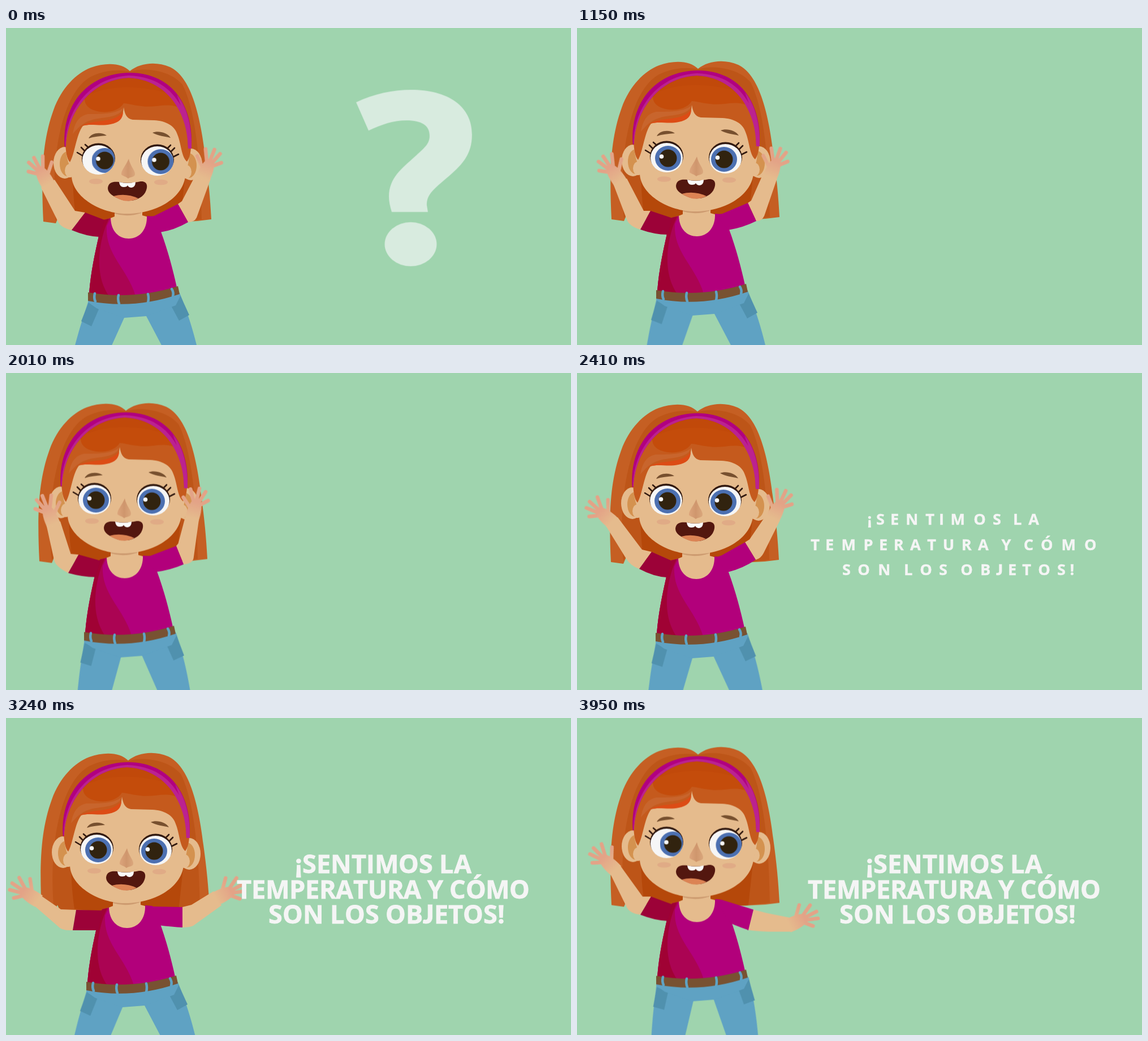
Animation, 999 px wide and 560 px high, one loop 4.03 s. Source, as an HTML page without scripts:

```html
<!DOCTYPE html>
<html lang="es">
<head>
<meta charset="utf-8">
<title>Sentimos</title>
<style>
html,body{margin:0;width:100%;height:100%;overflow:hidden;background:#9fd4ae}
svg{position:absolute;left:0;top:0;width:999px;height:560px}
.body,.leg,.iris,.ask,.arm,.sleeve,.hand,.line i{animation:4030ms linear infinite}

.body{animation-name:sway}
@keyframes sway{
  0%{transform:translate(0,0)}
  13.15%{transform:translate(-2px,0)}
  28.5%{transform:translate(-5px,-4px)}
  40.4%{transform:translate(-7px,-7.5px)}
  50%{transform:translate(-7px,-9.5px)}
  59.8%{transform:translate(-6px,-8px)}
  67%{transform:translate(-6px,-9px)}
  80.4%{transform:translate(-3px,-1px)}
  98%,100%{transform:translate(-5px,-11.5px)}
}

.leg{animation-name:legL;transform-origin:155px 485px}
.leg.r{animation-name:legR;transform-origin:300px 478px}
@keyframes legL{
  0%{transform:rotate(0)}
  13.15%{transform:rotate(-.7deg)}
  28.5%{transform:rotate(-5deg)}
  40.4%,59.8%{transform:rotate(-8deg)}
  50%,67%{transform:rotate(-9deg)}
  80.4%{transform:rotate(-1.5deg)}
  98%,100%{transform:rotate(-11deg)}
}
@keyframes legR{
  0%,13.15%,28.5%,80.4%{transform:rotate(0)}
  40.4%{transform:rotate(2.2deg)}
  50%,67%{transform:rotate(4deg)}
  59.8%{transform:rotate(3deg)}
  98%,100%{transform:rotate(8.5deg)}
}

.iris{animation-name:look}
@keyframes look{
  0%,1.7%,91%,100%{transform:translate(8.5px,0)}
  7%,86%{transform:translate(0,0)}
}

.ask{animation-name:flip;transform-origin:728px 280px}
@keyframes flip{
  0%{transform:scale(1,1);opacity:1}
  3.3%{transform:scale(.904,.846)}
  6.6%{transform:scale(.808,.607)}
  9.9%{transform:scale(.711,.335)}
  13.15%,14.8%{transform:scale(.615,.08);opacity:1}
  14.85%,100%{transform:scale(.615,0);opacity:0}
}

/* arms: outline, sleeve and hand share the same beats */
.arm.l{animation-name:armL}
@keyframes armL{
  0%{d:path("M140 326L122 323L86 268L62 282L92 342Q97 353 116 357Z")}
  3.7%,22.3%{d:path("M139 325L122 322L74 271L51 285L90 338Q98 348 117 354Z")}
  13.15%,32.3%,51.1%{d:path("M135 331L121 330L106 272L81 277L92 340Q93 352 117 364Z")}
  28.5%{d:path("M135 327L123 327L93 270L68 277L93 342Q97 354 117 360Z")}
  40.4%{d:path("M139 324L125 320L79 267L57 281L91 332Q99 344 117 352Z")}
  59.8%{d:path("M138 324L121 320L78 263L57 278L93 336Q101 349 116 354Z")}
  80.4%{d:path("M127 340L100 339L65 315L50 330L95 369Q101 377 121 376Z")}
  98%,100%{d:path("M136 327L121 327L82 273L63 285L93 346Q99 357 117 359Z")}
}
.sleeve.l{animation-name:sleeveL}
@keyframes sleeveL{
  0%{d:path("M174 339L140 326L116 357Q142 368 165 369Z")}
  3.7%,22.3%,40.4%{d:path("M174 340L139 324L117 352Q142 367 165 369Z")}
  13.15%,32.3%,51.1%{d:path("M174 341L135 331L117 364Q142 370 165 370Z")}
  28.5%{d:path("M174 340L135 327L117 360Q142 369 165 369Z")}
  59.8%{d:path("M174 340L138 324L116 354Q142 368 165 369Z")}
  80.4%{d:path("M174 341L127 340L121 376Q145 376 166 376Z")}
  98%,100%{d:path("M174 341L136 327L117 359Q142 369 165 370Z")}
}
.hand.l{animation-name:handL}
@keyframes handL{
  0%{transform:translate(74px,275px) rotate(-28deg)}
  3.7%,22.3%{transform:translate(62px,278px) rotate(-50deg)}
  13.15%,32.3%,51.1%{transform:translate(93px,275px) rotate(-18deg)}
  28.5%{transform:translate(80px,274px) rotate(-34deg)}
  40.4%{transform:translate(68px,274px) rotate(-48deg)}
  59.8%{transform:translate(67px,270px) rotate(-48deg)}
  80.4%{transform:translate(57px,322px) rotate(-56deg)}
  98%,100%{transform:translate(71px,278px) rotate(-45deg)}
}
.arm.r{animation-name:armR}
@keyframes armR{
  0%{d:path("M304 311L311 306L335 260L362 266L337 335Q333 343 322 343Z")}
  3.7%,22.3%,40.4%{d:path("M299 306L308 299L346 258L368 270L336 322Q331 332 322 335Z")}
  13.15%,32.3%,51.1%{d:path("M309 316L312 312L321 265L346 265L339 338Q338 348 321 349Z")}
  28.5%{d:path("M307 313L313 309L334 262L359 270L336 336Q332 345 322 345Z")}
  59.8%{d:path("M303 307L311 302L341 258L365 268L336 326Q331 336 322 338Z")}
  80.4%{d:path("M315 335L331 331L370 307L384 332L334 368Q328 371 315 371Z")}
  98%,100%{d:path("M317 350L340 356L380 364L384 389L345 389Q320 388 308 386Z")}
}
.sleeve.r{animation-name:sleeveR}
@keyframes sleeveR{
  0%{d:path("M251 334L262 332L304 311L322 343Q298 357 272 361Z")}
  3.7%,22.3%,40.4%{d:path("M251 334L262 329L299 306L322 335Q298 353 272 360Z")}
  13.15%,32.3%,51.1%{d:path("M251 334L262 333L309 316L321 349Q298 358 272 361Z")}
  28.5%{d:path("M251 334L262 332L307 313L322 345Q298 357 272 361Z")}
  59.8%{d:path("M251 334L262 330L303 307L322 338Q298 354 272 360Z")}
  80.4%{d:path("M250 332L262 334L315 335L315 371Q298 370 272 367Z")}
  98%,100%{d:path("M249 331L262 333L317 350L308 386Q298 383 276 374Z")}
}
.hand.r{animation-name:handR}
@keyframes handR{
  0%{transform:translate(349px,263px) rotate(22deg) scaleX(-1)}
  3.7%,22.3%,40.4%{transform:translate(357px,264px) rotate(29deg) scaleX(-1)}
  13.15%,32.3%,51.1%{transform:translate(334px,264px) rotate(12deg) scaleX(-1)}
  28.5%{transform:translate(347px,266px) rotate(20deg) scaleX(-1)}
  59.8%{transform:translate(353px,263px) rotate(25deg) scaleX(-1)}
  80.4%{transform:translate(376px,319px) rotate(62deg) scaleX(-1)}
  98%,100%{transform:translate(382px,377px) rotate(63deg) scaleX(-1)}
}

.line{position:absolute;left:367px;width:600px;top:235.3px;text-align:center;white-space:pre;
  font:700 45px/44.5px "Open Sans","Noto Sans",sans-serif;color:#f5f5f5;-webkit-text-stroke:.8px #f5f5f5}
.line:nth-of-type(2){top:279.8px;letter-spacing:-.3px}
.line:nth-of-type(3){top:324.2px;left:373px}
.line i{display:inline-block;font-style:normal;transform-origin:50% 23.7px;animation-name:grow}
.line b{font:900 45px/1 Lato,sans-serif}
@keyframes grow{
  0%,54.5%{transform:scale(0)}
  59.8%{transform:scale(.6)}
  65.5%,100%{transform:scale(1)}
}
</style>
</head>
<body>
<svg viewBox="0 0 999 560">
  <defs>
    <linearGradient id="palm" gradientUnits="userSpaceOnUse" x1="0" y1="2" x2="0" y2="-28">
      <stop offset="0" stop-color="#e5bb8d"/><stop offset="1" stop-color="#e3a387"/>
    </linearGradient>
    <linearGradient id="nose" x1="0" x2="1">
      <stop offset="0" stop-color="#dca57c"/><stop offset=".5" stop-color="#cf966d"/><stop offset="1" stop-color="#daa77c"/>
    </linearGradient>
    <clipPath id="eyeL"><ellipse cx="163.5" cy="232" rx="29" ry="27"/></clipPath>
    <clipPath id="eyeR"><ellipse cx="267.5" cy="234" rx="29" ry="27"/></clipPath>
    <g id="hand" stroke="url(#palm)" stroke-width="6.5" stroke-linecap="round">
      <path d="M7-14L24-30M5-28L15-47M0-30L0-52M-5-29L-12-49M-8-24L-20-35"/>
      <path d="M-12 5C-14-12-12-33-1-34C10-34 13-12 12 5Z" fill="url(#palm)" stroke="none"/>
    </g>
    <g id="iris">
      <ellipse rx="23" ry="22" fill="#4c70b1"/>
      <circle r="15.5" fill="#31230f"/>
      <circle cx="-11.5" cy="-3" r="3.8" fill="#f8f8f8"/>
    </g>
  </defs>

  <g class="ask" fill="#d8ebdf">
    <path d="M619 131C650 116 685 109 716 109C782 109 824 138 824 188C824 225 805 243 778 266C752 288 744 296 744 313L746 325L682 325C679 315 677 307 677 298C677 265 700 248 722 228C740 211 749 205 749 190C749 172 735 163 708 163C685 163 665 170 641 181Z"/>
    <ellipse cx="715.5" cy="382" rx="46" ry="39"/>
  </g>

  <g class="body">
    <!-- back hair -->
    <path fill="#c55f23" d="M66 342C62 260 64 200 84 145C98 106 124 80 150 70C178 60 205 62 219 76C236 62 265 58 290 69C326 86 343 150 352 225C358 268 361 300 363 338L338 341L300 343L98 340L94 331L88 345Z"/>
    <path fill="#bd5518" d="M88 340C78 230 98 115 150 86C180 72 205 74 219 77C240 70 288 72 312 100C338 150 345 260 346 338L300 343L98 340L94 331Z"/>
    <path fill="#b5480a" d="M118 250C118 290 121 318 124 338L190 346L250 346L308 342L318 250Z"/>

    <!-- jeans -->
    <g class="leg">
      <path fill="#5fa2c3" d="M147 478C137 510 128 535 116 585L176 585L209 512L230 482Z"/>
      <path fill="#5091ae" d="M146 485L164 497L151 527L133 518Z"/>
    </g>
    <g class="leg r">
      <path fill="#5fa2c3" d="M307 468C320 500 332 535 343 585L288 585L248 509L220 482Z"/>
      <path fill="#5091ae" d="M308 472L324 507L306 517L291 489Z"/>
    </g>
    <path fill="#5fa2c3" d="M146 478L306 466L308 474L300 490L248 509L209 512L160 495L145 484Z"/>

    <!-- neck and shirt -->
    <path fill="#e5bb8d" d="M192 318L241 318L241 331L252 334L240 374L190 374L182 337L192 333Z"/>
    <path fill="#cd9b70" d="M192 324Q216 330 241 323L239 327Q215 335 192 328Z"/>
    <path fill="#b2007b" d="M185 336C186 360 200 372 217 372C237 372 250 355 249 332L262 333L274 360C286 392 296 430 302 458Q225 482 147 469C150 430 158 395 164 368L173 339Z"/>
    <path fill="#ab0453" d="M185 336L178 350C175 400 214 424 229 473Q185 474 147 469C150 430 158 395 164 368L173 339Z"/>
    <path fill="#a00234" d="M182 337C168 365 152 430 182 473L147 469C150 430 158 395 164 368L173 339Z"/>
    <path fill="#785232" d="M145 467Q225 481 304 456L307 470Q225 498 145 482Z"/>
    <path fill="none" stroke="#5fa3c4" stroke-width="4.5" stroke-linecap="round" d="M157 469Q155 477 158 483M199 472Q197 479 200 487M251 470Q253 477 251 485M293 461Q297 467 295 474"/>

    <!-- head -->
    <g fill="#e5bb8d">
      <ellipse cx="104" cy="238" rx="20" ry="28"/>
      <ellipse cx="327" cy="241" rx="20" ry="28"/>
    </g>
    <g fill="#d4924f">
      <ellipse cx="109" cy="240" rx="14" ry="22"/>
      <ellipse cx="323" cy="243" rx="14" ry="22"/>
    </g>
    <g fill="#e5bb8d">
      <ellipse cx="113" cy="252" rx="9" ry="12"/>
      <ellipse cx="319" cy="254" rx="9" ry="12"/>
      <path d="M106 215C108 240 116 246 116 262C118 300 170 329 215 328C262 328 312 303 317 262C320 246 326 235 324 200L300 120L130 120Z"/>
    </g>

    <!-- fringe -->
    <path fill="#c55a1d" d="M105 205C103 140 150 86 217 82C285 85 327 135 327 212C326 225 323 232 320 236C310 228 310 205 303 188C298 172 282 164 262 163L224 162C213 160 210 152 208 140C207 152 205 162 190 168C170 174 150 168 136 173C124 188 122 222 113 237C107 230 106 218 105 205Z"/>
    <path fill="#c44c0b" d="M150 103C175 88 200 84 217 84C260 86 290 105 310 142C285 130 265 142 240 138C222 136 214 133 208 133C195 155 150 152 141 134C136 122 142 110 150 103Z"/>
    <path fill="#c0470a" opacity=".5" d="M152 103C200 80 255 84 296 118C250 104 195 98 152 116Z"/>
    <path fill="#cb6d38" opacity=".6" d="M118 187C122 165 130 155 145 152C170 152 195 152 207 141C203 160 165 157 150 163C134 168 126 178 118 187Z"/>
    <path fill="#dc4c15" d="M134 173C155 160 190 170 207 148C207 160 200 167 185 170C166 174 150 168 134 173Z"/>
    <path fill="#b10080" d="M104 211C98 140 140 80 219 79C297 80 332 140 328 213L322 213C324 150 285 91 217 88C150 91 108 150 106 208Z"/>
    <path fill="#bb2290" d="M105 208C106 140 152 87 217 84C264 86 291 106 309 137L302 118C322 142 329 180 328 213L322 213C322 150 285 91 217 88C150 91 108 150 106 208Z"/>

    <!-- eyes -->
    <g fill="#77502f">
      <path d="M146 195C151 185 168 183 178 190C166 191 155 192 146 195Z"/>
      <path d="M259 185C268 181 285 184 291 194C280 191 270 191 259 185Z"/>
    </g>
    <g fill="#31190f">
      <ellipse cx="163.5" cy="230.5" rx="29.5" ry="27"/>
      <ellipse cx="267.5" cy="232.5" rx="29.5" ry="27"/>
    </g>
    <path fill="none" stroke="#31190f" stroke-width="2.6" stroke-linecap="round" d="M126 220L136 226M133 211L141 219M140 206L148 213M305 223L295 228M298 212L290 220M291 207L284 214"/>
    <g fill="#f6f6f6">
      <ellipse cx="163.5" cy="233" rx="28.5" ry="26"/>
      <ellipse cx="267.5" cy="235" rx="28.5" ry="26"/>
    </g>
    <g clip-path="url(#eyeL)"><g class="iris"><use href="#iris" x="166" y="234"/></g></g>
    <g clip-path="url(#eyeR)"><g class="iris"><use href="#iris" x="265" y="236"/></g></g>

    <!-- nose, cheeks, mouth -->
    <path fill="url(#nose)" d="M217 231C212 243 203 252 204 259C207 262 212 262 216 266C219 263 227 264 228 259C229 252 220 245 217 231Z"/>
    <g fill="#e0ab86">
      <ellipse cx="159" cy="271" rx="12" ry="4.8"/>
      <ellipse cx="274" cy="272.5" rx="12" ry="4.8"/>
    </g>
    <path fill="#53170f" d="M180 283C181 272 190 271 200 272Q215 276 238 271C250 270 252 280 246 291C237 305 217 308 203 303C190 298 180 292 180 283Z"/>
    <path fill="#dc8354" d="M190 297Q212 291 234 301Q222 307 208 305Q198 302 190 297Z"/>
    <path fill="#fafafa" d="M200 272Q201 281 208 281Q214 281 215 278Q217 282 222 282Q229 281 229 272Q215 276 200 272Z"/>

    <!-- arms -->
    <path class="arm l" fill="#e5bb8d" d="M140 326L122 323L86 268L62 282L92 342Q97 353 116 357Z"/>
    <g class="hand l"><use href="#hand"/></g>
    <path class="sleeve l" fill="#9c0238" d="M174 339L140 326L116 357Q142 368 165 369Z"/>
    <path class="arm r" fill="#e5bb8d" d="M304 311L311 306L335 260L362 266L337 335Q333 343 322 343Z"/>
    <g class="hand r"><use href="#hand"/></g>
    <path class="sleeve r" fill="#b2007b" d="M251 334L262 332L304 311L322 343Q298 357 272 361Z"/>
  </g>
</svg>
<div class="line"><i>¡</i><i>S</i><i>E</i><i>N</i><i>T</i><i>I</i><i>M</i><i>O</i><i>S</i> <i>L</i><i>A</i></div>
<div class="line"><i>T</i><i>E</i><i>M</i><i>P</i><i>E</i><i>R</i><i>A</i><i>T</i><i>U</i><i>R</i><i>A</i> <i>Y</i> <i>C</i><i>Ó</i><i>M</i><i>O</i></div>
<div class="line"><i>S</i><i>O</i><i>N</i> <i>L</i><i>O</i><i>S</i> <i>O</i><i>B</i><i><b>J</b></i><i>E</i><i>T</i><i>O</i><i>S</i><i>!</i></div>
</body>
</html>
```
